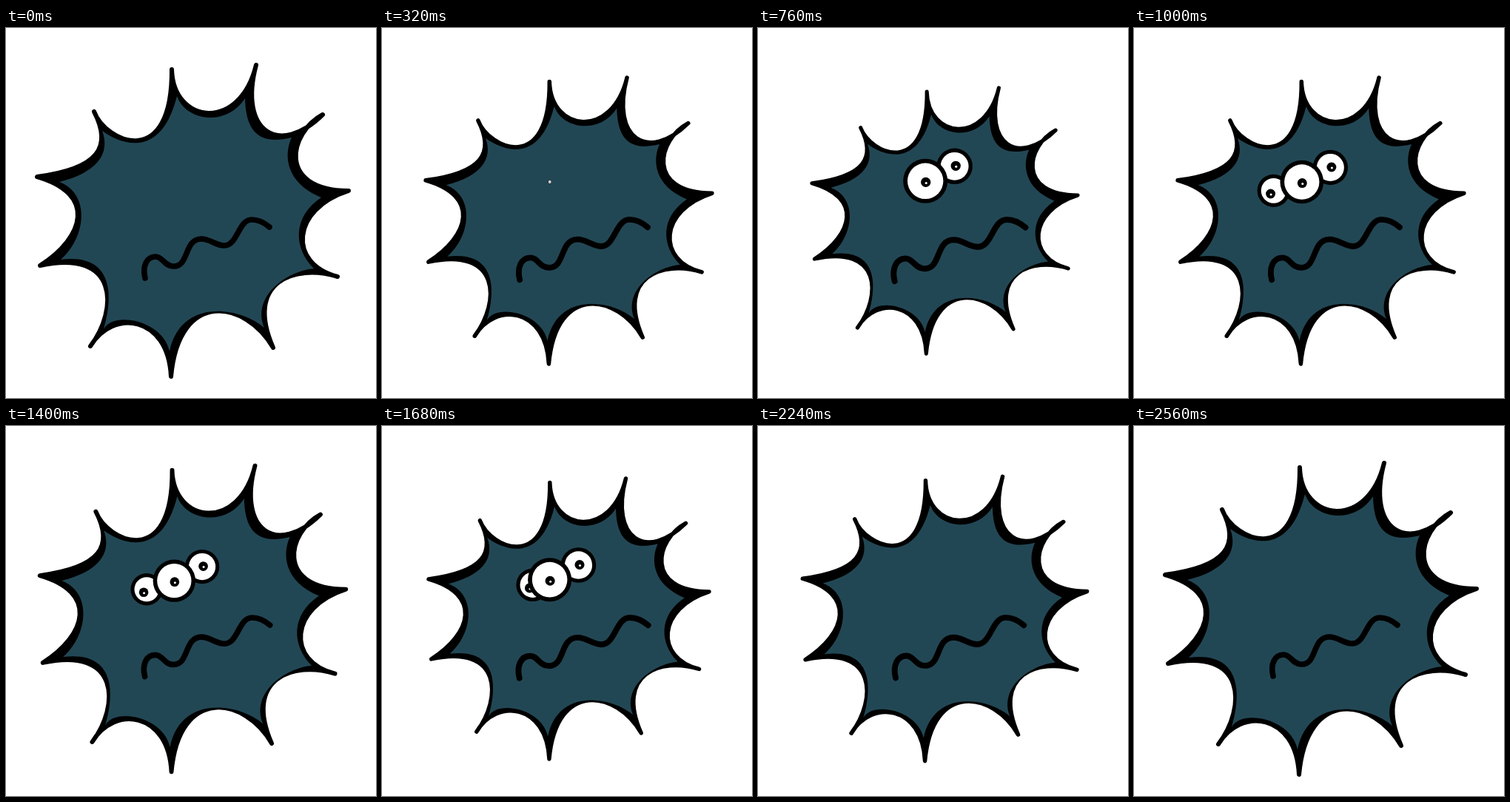
An HTML page with a canvas for the animation above (2600 ms loop, 500 by 500 pixels).

```html
<!DOCTYPE html>
<html>
<head>
<meta charset="utf-8">
<style>
  html, body { margin: 0; width: 100%; height: 100%; overflow: hidden; background: #fff; }
  canvas { display: block; width: 500px; height: 500px; }
</style>
</head>
<body>
<canvas id="stage" width="500" height="500"></canvas>
<script>
const ctx = document.getElementById('stage').getContext('2d');
const LOOP = 2600, STEP = 40;
const CENTER = { x: 252.5, y: 260.5 };
const TEAL = '#224754';

const shell = new Path2D(`M224 56 C226 130 316 141 338 50 C314 140 369 175 428 117
  C383 141 365 219 463 220 C385 245 381 319 448 336 C390 318 322 343 361 432
  C324 368 234 352 223 471 C219 388 144 379 114 430 C152 380 152 298 46 321
  C107 282 122 224 42 201 C125 190 144 161 119 113 C135 155 225 194 224 56Z`);

const flesh = new Path2D(`M231 92 C243 126 298 134 323 95 C324 135 338 160 386 148
  C375 172 378 209 426 229 C386 256 389 298 416 325 C378 329 332 363 349 405
  C315 376 236 365 221 437 C212 395 145 382 132 407 C145 363 146 304 74 313
  C109 282 114 224 72 208 C121 196 142 171 130 139 C153 156 209 180 231 92Z`);

const mouth = new Path2D(`M188 338 C184 322 190 309 202 309 C212 309 214 322 226 322
  C248 323 240 285 264 285 C276 285 283 294 295 294 C313 294 314 259 332 259
  C342 259 349 263 356 269`);

const eyes = {
  middle: { x: 227.5, y: 209.5, r: 28.5, line: 5.5, px: 0.5, py: 1.5, show: [304, 500], hide: [2020, 2220] },
  right: { x: 265, y: 190.5, r: 23, line: 5, px: 1.5, py: -0.5, show: [510, 710], hide: [1810, 2010] },
  left: { x: 190.5, y: 221, r: 21.5, line: 5, px: -4, py: 4, show: [770, 960], hide: [1600, 1800] }
};

const clamp01 = v => Math.max(0, Math.min(1, v));
const ramp = (t, [from, to]) => clamp01((t - from) / (to - from));
const presence = (eye, t) => ramp(t, eye.show) - ramp(t, eye.hide);

// 0 when fully swollen, 1 when fully contracted
function squeeze(t) {
  const turns = [0, 660, 1320, 1940, 2560];
  let i = 0;
  while (i < 3 && t >= turns[i + 1]) i++;
  const p = ramp(t, [turns[i], turns[i + 1]]);
  const eased = 0.73 * p + 0.27 * (1 - Math.cos(Math.PI * p)) / 2;
  return i % 2 ? 1 - eased : eased;
}

function scaled(x, y, s, draw) {
  ctx.save();
  ctx.translate(x, y);
  ctx.scale(s, s);
  ctx.translate(-x, -y);
  draw();
  ctx.restore();
}

function disc(x, y, r, color) {
  ctx.fillStyle = color;
  ctx.beginPath();
  ctx.arc(x, y, r, 0, 2 * Math.PI);
  ctx.fill();
}

function drawEye(eye, x, y) {
  disc(x, y, eye.r, '#000');
  disc(x, y, eye.r - eye.line, '#fff');
  disc(x + eye.px, y + eye.py, 6.3, '#000');
  disc(x + eye.px + 0.5, y + eye.py + 1, 1.5, '#fff');
}

function drawSideEye(eye, t) {
  const p = presence(eye, t), m = eyes.middle;
  if (p > 0) drawEye(eye, m.x + (eye.x - m.x) * p, m.y + (eye.y - m.y) * p);
}

function drawBody() {
  ctx.fillStyle = ctx.strokeStyle = '#000';
  ctx.lineWidth = 6;
  ctx.fill(shell);
  ctx.stroke(shell);
  ctx.fillStyle = TEAL;
  ctx.fill(flesh);
}

function drawFace(t) {
  ctx.strokeStyle = '#000';
  ctx.lineWidth = 7.6;
  ctx.stroke(mouth);
  drawSideEye(eyes.right, t);
  drawSideEye(eyes.left, t);
  const m = eyes.middle, size = presence(m, t);
  if (size > 0) scaled(m.x, m.y, size, () => drawEye(m, m.x, m.y));
}

function render(now) {
  const t = Math.floor((now % LOOP) / STEP) * STEP;
  const s = squeeze(t);
  ctx.fillStyle = '#fff';
  ctx.fillRect(0, 0, 500, 500);
  ctx.lineCap = ctx.lineJoin = 'round';
  scaled(CENTER.x, CENTER.y, 1 - 0.168 * s, drawBody);
  scaled(CENTER.x, CENTER.y, 1 + 0.06 * s, () => drawFace(t));
}

let start;
function tick(now) {
  if (start === undefined) start = now;
  render(Math.max(0, now - start));
  requestAnimationFrame(tick);
}
render(0);
requestAnimationFrame(tick);
</script>
</body>
</html>
```
